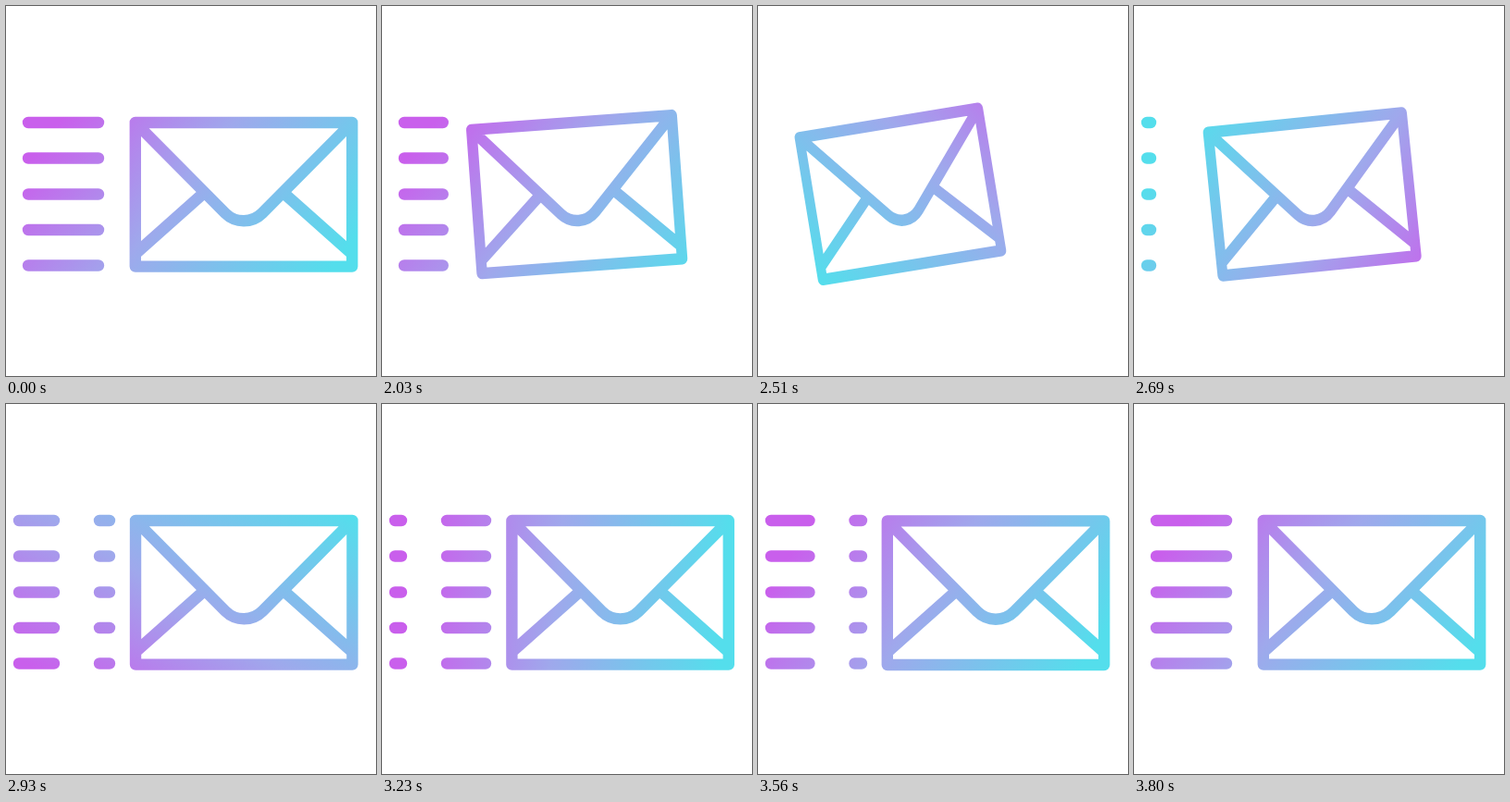
These frames come from a looping animation (400x400 px, 3.83 s). An HTML page with a canvas:

```html
<!DOCTYPE html>
<html lang="en">
<head>
<meta charset="utf-8">
<title>Sending mail</title>
<style>
  html, body { margin: 0; width: 100%; height: 100%; overflow: hidden; background: #fff; }
  canvas { display: block; width: 400px; height: 400px; }
</style>
</head>
<body>
<canvas id="stage" width="400" height="400"></canvas>
<script>
const ctx = document.getElementById('stage').getContext('2d');
const LOOP = 3830, STEP = 30, START = 2000, END = 3800;
const ROWS = [126, 164.5, 203.5, 242, 280.5];
const CENTER = { x: 257, y: 204 };
const RAD = Math.PI / 180;

const envelope = new Path2D(
  'M139.8 126H374.2V281.6H139.8Z' +
  'M139.8 126L237 224A28.3 28.3 0 0 0 277 224L374.2 126' +
  'M214 202L139.8 268M300 202L374.2 268');

const clamp = v => Math.min(1, Math.max(0, v));
const span = (t, a, b) => clamp((t - a) / (b - a));
const easeOut = u => 1 - (1 - u) ** 3;
const easeInOut = u => u < .5 ? 4 * u ** 3 : 1 - 4 * (1 - u) ** 3;

// y of cubic-bezier(x1, 0, x2, 1) at x
function bezier(x, x1, x2) {
  let lo = 0, hi = 1;
  for (let i = 0; i < 24; i++) {
    const m = (lo + hi) / 2, n = 1 - m;
    if (3 * n * n * m * x1 + 3 * n * m * m * x2 + m ** 3 < x) lo = m; else hi = m;
  }
  return lo * lo * (3 - 2 * lo);
}

// How far the envelope is pulled back: 0 at rest, 1 at the far left
function pull(t) {
  if (t <= START || t >= END) return 0;
  if (t < 2400) return .45 + .57 * easeOut(span(t, 2030, 2400));
  if (t < 2540) return 1.02 - .02 * span(t, 2400, 2510);
  return 1 - easeInOut(span(t, 2540, 2870));
}

function drawLines(from, to) {
  if (to - from < .5) return;
  ctx.beginPath();
  for (const y of ROWS) {
    ctx.moveTo(from, y);
    ctx.lineTo(to, y);
  }
  ctx.stroke();
}

function drawTrail(t, p) {
  ctx.lineCap = 'round';
  if (t <= START || t >= END) {
    drawLines(24, 100);
  } else if (t < 2540) {
    drawLines(24, 100 - 76 * p);
  } else if (p < .95) {
    const head = 101 - 32.5 * (t - 2930) / STEP;
    ctx.setLineDash([49, 49]);
    ctx.lineDashOffset = 14 - head;
    drawLines(14, 14 + 98 * (1 - p));
  }
  ctx.setLineDash([]);
}

function drawEnvelope(t, p) {
  let dx = -103 * p, dy = -.5 * p;
  if (t > 2870 && t < END) {
    const a = (t - 3200) / 360 * Math.PI / 2;
    dx += .6 * Math.cos(a);
    dy += .4 * Math.max(0, Math.sin(a));
  }
  ctx.save();
  ctx.translate(CENTER.x + dx, CENTER.y + dy);
  ctx.rotate(-9.3 * p * RAD);
  ctx.scale(1 - .165 * p, 1);
  ctx.translate(-CENTER.x, -CENTER.y);
  ctx.lineCap = 'butt';
  ctx.stroke(envelope);
  ctx.restore();
}

// Colours everything drawn so far with the turning gradient
function tint(t) {
  const angle = (38 + 360 * bezier(span(t, START, END), .4, .3)) * RAD;
  const x = 165 * Math.cos(angle), y = 165 * Math.sin(angle);
  const g = ctx.createLinearGradient(205 - x, 204 - y, 205 + x, 204 + y);
  g.addColorStop(0, '#c95fec');
  g.addColorStop(.45, '#9fa8ec');
  g.addColorStop(1, '#54deec');
  ctx.globalCompositeOperation = 'source-in';
  ctx.fillStyle = g;
  ctx.fillRect(0, 0, 400, 400);
  ctx.globalCompositeOperation = 'source-over';
}

function draw(ms) {
  const time = ms % LOOP;
  const t = time < 2030 ? START : Math.floor((time - START) / STEP) * STEP + START;
  const p = pull(t);
  ctx.clearRect(0, 0, 400, 400);
  ctx.lineWidth = 12.4;
  ctx.lineJoin = 'round';
  drawTrail(t, p);
  drawEnvelope(t, p);
  tint(t);
}

const begin = performance.now();
function tick() {
  draw(performance.now() - begin);
  requestAnimationFrame(tick);
}
tick();
</script>
</body>
</html>
```
